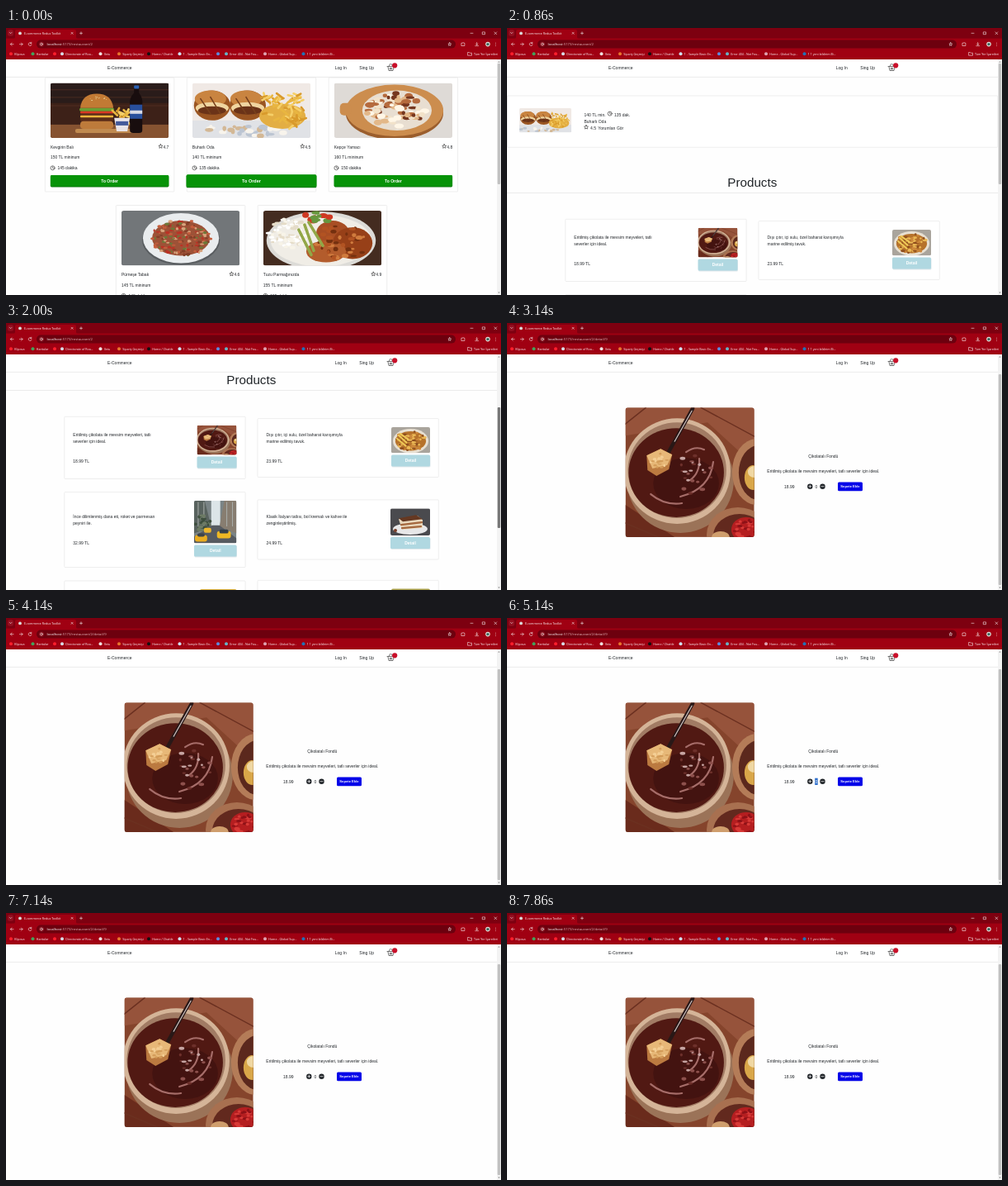
Animation of 600 by 323 pixels, one loop 8 s. Source, as an HTML page:

```html
<!DOCTYPE html>
<html lang="tr">
<head>
<meta charset="utf-8">
<title>E-commerce Redux Toolkit</title>
<style>
html, body { margin: 0; width: 100%; height: 100%; overflow: hidden; background: #fff; }
svg { display: block; }
#stage { width: 100%; height: 100%; }
text { font: 5px "Liberation Sans", Arial, sans-serif; fill: #212529; white-space: pre; }
.ui text { font: 3.6px "Open Sans", "Noto Sans", sans-serif; fill: #fff; }
.ui .url { font-size: 4.3px; fill: #e3b4b8; }
.ui .host { fill: #fff; }
.mid { text-anchor: middle; }
.end { text-anchor: end; }
.btn { font-weight: bold; fill: #fff; text-anchor: middle; }
.line { fill: none; stroke: #222; stroke-width: .6; stroke-linecap: round; stroke-linejoin: round; }
.ui .line { stroke: #fff; stroke-width: .55; }
.box { fill: #fff; stroke: #e2e2e2; stroke-width: .6; }

.list, .menu, .detail, .shop, .drag, .picked, .scroll, .add { animation: 8s linear infinite; }
.list { animation-name: list; }
.menu { animation-name: menu; }
.shop { animation-name: shop; }
.detail { animation-name: detail; }
.scroll { animation-name: scroll; }
.thumb { animation-name: thumb; }
.drag { animation-name: drag; }
.picked { animation-name: picked; }
.add { animation-name: add; transform-origin: 416px 197.8px; }
.list, .menu, .shop, .detail, .drag, .picked { animation-timing-function: step-end; }
@keyframes list { 0% { visibility: visible } 1.75%, 100% { visibility: hidden } }
@keyframes menu { 0% { visibility: hidden } 1.75% { visibility: visible } 34%, 100% { visibility: hidden } }
@keyframes shop { 0% { visibility: visible } 34%, 100% { visibility: hidden } }
@keyframes detail { 0% { visibility: hidden } 34%, 100% { visibility: visible } }
@keyframes scroll {
  0%, 16.125% { transform: none; animation-timing-function: ease-in-out }
  24.5%, 100% { transform: translateY(-118px) }
}
@keyframes thumb {
  0%, 16.125% { transform: none; animation-timing-function: ease-in-out }
  24.5%, 100% { transform: translateY(59px) }
}
@keyframes drag { 0% { fill: #c1c1c1 } 16.125% { fill: #787878 } 28.6%, 100% { fill: #c1c1c1 } }
@keyframes picked { 0% { visibility: hidden } 55.4% { visibility: visible } 87.5%, 100% { visibility: hidden } }
@keyframes add { 0%, 75% { transform: none } 77%, 86% { transform: scale(1.08) } 88%, 100% { transform: none } }
</style>
</head>
<body>
<svg id="stage" viewBox="0 0 600 323" preserveAspectRatio="none"></svg>
<script>
let seed = 7;
const random = () => (seed = (seed * 16807) % 2147483647) / 2147483647;

const text = (x, y, s, cls = '') => `<text x="${x}" y="${y}" class="${cls}">${s}</text>`;
const rect = (x, y, w, h, fill, r = 0) => `<rect x="${x}" y="${y}" width="${w}" height="${h}" fill="${fill}" rx="${r}"/>`;
const oval = (x, y, rx, ry, fill, extra = '') => `<ellipse cx="${x}" cy="${y}" rx="${rx}" ry="${ry}" fill="${fill}" ${extra}/>`;
const dot = (x, y, r, fill) => oval(x, y, r, r, fill);
const path = (d, fill, extra = '') => `<path d="${d}" fill="${fill}" ${extra}/>`;
const line = d => `<path class="line" d="${d}"/>`;
const stroke = (d, color, w) => path(d, 'none', `stroke="${color}" stroke-width="${w}" stroke-linecap="round"`);
const box = (x, y, w, h) => `<rect class="box" x="${x}" y="${y}" width="${w}" height="${h}" rx=".8"/>`;
const clock = (x, y) => `<circle class="line" cx="${x}" cy="${y}" r="2.5"/>` + line(`M${x} ${y - 1.5}v1.6l1 .6`);

function star(x, y, r = 2.6) {
  const points = Array.from({ length: 10 }, (_, i) => {
    const a = i * Math.PI / 5, d = i % 2 ? r * .48 : r;
    return `${(x + d * Math.sin(a)).toFixed(2)},${(y - d * Math.cos(a)).toFixed(2)}`;
  });
  return `<polygon class="line" points="${points.join(' ')}"/>`;
}

// Random bits of food inside an ellipse
function scatter(n, cx, cy, rx, ry, colors, size) {
  let out = '';
  for (let i = 0; i < n; i++) {
    const a = random() * 2 * Math.PI, d = Math.sqrt(random());
    out += oval((cx + rx * d * Math.cos(a)).toFixed(1), (cy + ry * d * Math.sin(a)).toFixed(1),
      (size * (.5 + random())).toFixed(1), (size * (.4 + random() * .5)).toFixed(1), colors[i % colors.length]);
  }
  return out;
}

function fries(n, x, y, w, h) {
  let out = '';
  for (let i = 0; i < n; i++) {
    const px = x + random() * w, py = y + random() * h;
    out += stroke(`M${px.toFixed(1)} ${py.toFixed(1)}l${(random() * 18 - 9).toFixed(1)} ${(random() * 14 - 7).toFixed(1)}`,
      ['#e9b640', '#f5cf68', '#d99a2b'][i % 3], 2.6);
  }
  return out;
}

const burger = (x, y, w) =>
  rect(x - w, y - 2, w * 2, 15, '#5a2c18', 4) + rect(x - w - 1, y - 4, w * 2 + 2, 4, '#69a033', 2) +
  rect(x - w, y, w * 2, 2.5, '#d93824', 1) + rect(x - w, y + 5, w * 2, 2.5, '#f0b53c', 1) +
  path(`M${x - w} ${y - 4}q2 -17 ${w} -17t${w} 17z`, '#c27a34') +
  rect(x - w, y + 12, w * 2, 9, '#bd7b3b', 4) + scatter(12, x, y - 14, w * .6, 4, ['#efd59a'], .7);

const bun = (x, y) =>
  oval(x, y, 22, 18, '#9a5522') + oval(x - 2, y - 8, 19, 10, '#c98440') + oval(x, y + 3, 20, 7, '#f0d5a0') +
  oval(x, y + 6, 17, 5, '#6b3318') + stroke(`M${x - 14} ${y - 8}l12 18m0 -20l12 20`, '#77401c', 1.6);

const photos = {
  burger: [143, 66, () => rect(0, 0, 143, 66, '#3d2118') + rect(0, 0, 143, 24, '#2a1c1a') +
    [8, 17, 27].map(y => rect(0, y, 143, .6, '#5c3325')).join('') + rect(0, 50, 143, 16, '#865331') +
    rect(30, 55, 72, 5, '#c08a50', 2) + burger(56, 34, 20) + fries(16, 80, 34, 12, 12) +
    path('M77 42h19l-3 16h-13z', '#e9e4e8') + rect(79, 46, 15, 5, '#445a9a') +
    path('M101 5h6v7q5 6 4 14v31q0 3-4 3h-7q-4 0-4-3v-31q-1-8 5-14z', '#180d0e') +
    rect(101, 3, 6, 4, '#2a61b4', 1) + rect(96, 26, 15, 17, '#284f9d') + rect(96, 33, 15, 4, '#d8dae6')],
  aroma: [143, 66, () => rect(0, 0, 143, 66, '#f0e9e5') + rect(0, 45, 143, 21, '#e0e2e6') +
    scatter(26, 60, 58, 60, 6, ['#d3b896', '#bcc5d2', '#f8f4ec'], 4) + bun(24, 27) + bun(67, 27) +
    oval(109, 40, 28, 15, '#e3ae43') + fries(60, 88, 14, 44, 36)],
  board: [143, 66, () => rect(0, 0, 143, 66, '#dedad6') + oval(73, 36, 59, 32, '#9b5e2d') + oval(73, 33, 59, 31, '#cc8d4e') +
    rect(7, 24, 14, 15, '#cc8d4e', 5) + oval(76, 33, 42, 24, '#e8ded1') +
    scatter(80, 76, 32, 37, 20, ['#b56a3d', '#f2e2c9', '#76371f', '#e3b889', '#fff6e6'], 4)],
  mince: [143, 66, () => rect(0, 0, 143, 66, '#727679') + oval(72, 35, 47, 30, '#595d60') + oval(72, 33, 46, 30, '#e9ecee') +
    oval(72, 33, 35, 21, '#9d5237') + scatter(150, 72, 33, 36, 22, ['#833f28', '#c45d3c', '#d8a27b', '#6c7839', '#bb3225'], 2)],
  grill: [143, 66, () => rect(0, 0, 143, 66, '#442c20') + oval(70, 36, 66, 35, '#dcdbd7') + oval(70, 36, 61, 31, '#f0ede6') +
    scatter(90, 31, 27, 25, 18, ['#f8f4e8', '#e5dcc8', '#fff'], 2.5) +
    oval(84, 27, 20, 15, '#a84e24') + oval(108, 39, 24, 19, '#974018') + oval(76, 49, 24, 13, '#b35c2c') +
    scatter(45, 94, 38, 32, 22, ['#d07b3d', '#74300f', '#b25322'], 3) + scatter(14, 66, 8, 17, 6, ['#cf3822', '#66963e'], 4) +
    stroke('M50 17l11 31m-18 -25l15 30m-3 -39l17 28', '#92a747', 3.5)],
  fondue: [157, 157, () => rect(0, 0, 157, 157, '#85442c') +
    path('M0 0H157V70L100 18L0 34z', '#96533b') + path('M0 118L60 157H0z', '#6a2b1c') +
    stroke('M92 0L157 35M0 20L25 0M0 140L40 157', '#6b3020', 1.5) +
    oval(67, 88, 65, 64, '#9b7358') + oval(63, 77, 65, 64, '#d4b498') + oval(63, 76, 60, 58, '#a17b64') +
    oval(62, 79, 58, 54, '#511913') + oval(74, 92, 40, 31, '#431310') +
    stroke('M67 108Q103 99 107 66M79 88Q91 79 90 62M31 105Q48 119 69 116M74 54Q85 46 96 51', '#a66d69', 2.2) +
    scatter(22, 82, 84, 24, 28, ['#8d504c', '#c6a4a2', '#6d302b'], 2.4) +
    stroke('M82 1L51 57', '#291817', 4.5) + stroke('M81 4L60 41', '#d0c5c4', 1.2) +
    path('M26 58L43 50L57 57L53 75L38 83L27 76z', '#bb7a40') + path('M26 58L43 50L57 57L51 70L33 74z', '#e7b878') +
    scatter(20, 41, 64, 11, 9, ['#f4cf95', '#d39c59'], 2) +
    oval(160, 78, 30, 40, '#b47c58') + oval(162, 79, 24, 33, '#5b281d') + oval(156, 85, 11, 15, '#d9a749') + oval(157, 78, 8, 7, '#efd7a3') +
    oval(137, 154, 38, 33, '#a87050') + oval(139, 156, 32, 27, '#62291e') +
    oval(147, 148, 18, 15, '#b51e20') + scatter(28, 147, 148, 15, 12, ['#d83a37', '#8e1117'], 2.6) +
    oval(116, 157, 11, 7, '#cf9e6d')],
  chicken: [48, 32, () => rect(0, 0, 48, 32, '#a9a49c') + oval(24, 17, 22, 15, '#e8e0d2') + oval(24, 17, 19, 12, '#b6722b') +
    scatter(60, 24, 17, 18, 12, ['#cd883b', '#8f4e1d', '#ebb956'], 2.2) + stroke('M9 10l10 9m-12 -5l11 9m-7 -15l10 7', '#efcb58', 2)],
  street: [52, 52, () => rect(0, 0, 52, 52, '#7a8486') + rect(21, 0, 11, 32, '#dce5e8') + path('M0 0H13L21 32L0 40z', '#59635f') +
    path('M52 0H37L31 32L52 40z', '#877d70') + path('M22 30H31L52 46V52H0V44z', '#565b61') +
    [5, 12, 40, 47].map(x => stroke(`M${x} 2V31`, '#aab1ad', 1)).join('') + scatter(25, 10, 27, 10, 9, ['#3d4e3d', '#6d7b65'], 2.5) +
    rect(28, 37, 17, 9, '#eeb824', 3) + rect(31, 35, 11, 5, '#354048', 2) + rect(12, 33, 9, 6, '#ebb52c', 2) + rect(1, 42, 15, 8, '#e9ac1f', 3) + rect(4, 40, 9, 4, '#3e454a', 2)],
  cake: [48, 33, () => rect(0, 0, 48, 33, '#4a4a4e') + oval(24, 25, 21, 7, '#e7e7e8') + path('M10 13L33 9L39 14V24L14 26z', '#ead9bd') +
    path('M10 12L31 8L39 13L15 16z', '#653822') + stroke('M13 20L38 17M14 24L37 22', '#a5683e', 2.2) + dot(6, 27, 2, '#783d27')],
};

function photo(name, x, y, w, h, r = 2) {
  const [vw, vh, draw] = photos[name], id = `clip${x}-${y}`;
  return `<clipPath id="${id}"><rect x="${x}" y="${y}" width="${w}" height="${h}" rx="${r}"/></clipPath>
    <g clip-path="url(#${id})"><svg x="${x}" y="${y}" width="${w}" height="${h}" viewBox="0 0 ${vw} ${vh}" preserveAspectRatio="none">${draw()}</svg></g>`;
}

function restaurant(x, y, name, image, rating, price, minutes, hover) {
  const grow = hover ? `transform="translate(${x + 78.2} ${y + 125}) scale(1.1) translate(${-x - 78.2} ${-y - 125})"` : '';
  return box(x, y, 156.4, 138) + photo(image, x + 6.5, y + 6.5, 143.4, 66.5, 3) +
    text(x + 6.5, y + 85.5, name) + star(x + 140, y + 83.2) + text(x + 150, y + 85.5, rating, 'end') +
    text(x + 6.5, y + 98.3, `${price} TL mininum`) + clock(x + 9.2, y + 109.3) + text(x + 15, y + 111.2, `${minutes} dakika`) +
    `<g ${grow}>` + rect(x + 6.5, y + 118.5, 143.4, 14, '#08770a', 1.4) + rect(x + 6.5, y + 118, 143.4, 13.6, '#079308', 1.4) +
    text(x + 78.2, y + 126.8, 'To Order', 'btn') + '</g>';
}

// baseY is the first text line; the picture sets the card height
function product(x, baseY, lines, price, image, imgX, imgY, w, h) {
  const by = imgY + h + 2;
  return box(x, imgY - 10.4, 219.3, h + 39.4) + lines.map((s, i) => text(x + 10.5, baseY + i * 8, s)).join('') +
    text(x + 10.5, baseY + 31.5, `${price} TL`) + photo(image, imgX, imgY, w, h) +
    rect(imgX + .5, by + .7, w, 14.2, '#dfe8eb', 1.5) + rect(imgX, by, w, 14, '#b0d8e1', 1.5) + text(imgX + w / 2, by + 8.6, 'Detail', 'btn');
}

const list = `<g class="list">` +
  restaurant(47.4, 60, 'Kevgirin Balı', 'burger', '4.7', 150, 145) +
  restaurant(219.3, 60, 'Buharlı Oda', 'aroma', '4.5', 140, 135, true) +
  restaurant(391.2, 60, 'Kepçe Yamacı', 'board', '4.8', 160, 150) +
  restaurant(133.4, 214.5, 'Pürneşe Tabak', 'mince', '4.6', 145, 140) +
  restaurant(305.3, 214.5, 'Tuzu Parmağınızda', 'grill', '4.9', 155, 155) + '</g>';

const menu = `<g class="menu"><g class="scroll">` + box(.3, 82, 594.5, 62.3) + photo('aroma', 15, 97, 63, 29.5, 1.5) +
  text(93.5, 106.7, '140 TL min.') + clock(124.7, 103.6) + text(130, 106.7, '135 dak.') + text(93.5, 114.7, 'Buharlı Oda') +
  star(96, 120) + text(101, 122.7, '4.5') + text(110.3, 122.7, 'Yorumları Gör') +
  `<text x="297.3" y="192" class="mid" style="font-size:15.2px">Products</text>` + rect(0, 199, 595, .6, '#dedede') +
  product(70.8, 255, ['Eritilmiş çikolata ile mevsim meyveleri, tatlı', 'severler için ideal.'], '18.99', 'fondue', 231.5, 241.7, 48, 35.8) +
  product(305, 255, ['Dışı çıtır, içi sulu, özel baharat karışımıyla', 'marine edilmiş tavuk.'], '23.99', 'chicken', 467, 244, 47, 31.5) +
  product(70.8, 354, ['İnce dilimlenmiş dana eti, roket ve parmesan', 'peyniri ile.'], '32.99', 'street', 228, 333, 51.5, 51.5) +
  product(305, 354, ['Klasik İtalyan tatlısı, bol kremalı ve kahve ile', 'zenginleştirilmiş.'], '24.99', 'cake', 466, 342.3, 48, 32.7) +
  box(70.8, 430, 219.3, 80) + rect(235, 440, 44.5, 30, '#d5aa35', 2) + box(305, 429.3, 219.3, 80) + rect(467, 439.6, 47, 30, '#a9a04a', 2) +
  '</g></g>';

const detail = `<g class="detail">` + photo('fondue', 143.4, 102.3, 156.4, 156.6, 3.5) +
  text(383.3, 163, 'Çikolatalı Fondü', 'mid') + text(383.3, 180.8, 'Eritilmiş çikolata ile mevsim meyveleri, tatlı severler için ideal.', 'mid') +
  text(336, 199.6, '18.99') + dot(367.3, 197.7, 3.2, '#212529') + dot(382.5, 197.7, 3.2, '#212529') +
  stroke('M365.8 197.7h3m-1.5 -1.5v3M381 197.7h3', '#fff', .7) + text(374.9, 199.6, '0', 'mid') +
  `<g class="picked">` + rect(373.2, 193.7, 3.5, 8.3, '#2f6fcb') + `<text x="374.9" y="199.6" class="mid" style="fill:#fff">0</text></g>` +
  `<g class="add">` + rect(401, 192.4, 30, 10.8, '#0505e8', 1.5) + `<text x="416" y="199.3" class="btn" style="font-size:4.17px">Sepete Ekle</text></g></g>`;

const header = rect(0, 38, 595, 21, '#fff') + rect(0, 58.9, 595, .6, '#dedede') +
  text(123, 50.4, 'E-Commerce') + text(398.8, 50.4, 'Log In') + text(428.3, 50.4, 'Sing Up') +
  line('M462 46.5h8.5M463 47l1 4.5h5l1-4.5M464.2 46l1.5-2.6M468.5 46l-1.5-2.6M465.3 48.2v1.8M466.5 48.2v1.8M467.7 48.2v1.8') + dot(471.2, 45.3, 3.1, '#c8102a');

const scrollbar = rect(595, 38, 5, 285, '#f3f3f3') + path('M596.4 41.6l1.1-1.4l1.1 1.4zM596.4 319.6l1.1 1.4l1.1-1.4z', '#777') +
  `<g class="shop"><g class="scroll thumb"><rect class="drag" x="595.8" y="43" width="3.4" height="146" rx="1"/></g></g>` +
  `<g class="detail">${rect(595.8, 62, 3.4, 255, '#c1c1c1', 1)}</g>`;

const bookmarks = [
  [6, '#ff1f2d', 'Klipova'], [32.5, '#43a35b', 'Haritalar'], [59, '#ff1f2d', ''], [68, '#d8dde8', 'Directorate of Roa...'],
  [114.5, '#eee2e0', 'Iletu'], [137, '#e8762d', 'Sipariş Geçmişi'], [173, '#111', 'Home / Chattle'], [210.5, '#cfe2f6', '1 - Sample Basic En...'],
  [257, '#5c8be0', ''], [267, '#66b3c5', 'Error 404 - Not Fou...'], [314, '#dfa1b0', 'Home - Global Sup...'], [360.5, '#2172b8', '1 1 yeni bildirim Bi...'],
].map(([x, color, label]) => dot(x, 31.2, 2, color) + text(x + 4.3, 32.5, label)).join('');

const url = (cls, tail) => `<text x="49.5" y="21.2" class="url ${cls}"><tspan class="host">localhost</tspan>:5173/restaurant/2${tail}</text>`;

const browser = `<g class="ui">` + rect(0, 0, 600, 13, '#7d0010') + rect(0, 12.6, 600, 25.4, '#a00012') +
  path('M9 13q2 0 2-2V4q0-2 2-2H83q2 0 2 2v7q0 2 2 2z', '#a00012') + rect(2, 2.2, 7, 7.6, '#930f20', 2) + line('M4.3 5.4l1.3 1.3l1.3-1.3') +
  dot(17, 6.4, 1.9, '#dadada') + text(22, 7.7, 'E-commerce Redux Toolkit') + line('M79 5.2l2.2 2.2m0-2.2l-2.2 2.2M89.5 6.3h3m-1.5-1.5v3') +
  line('M563 6.3h3M577.7 4.9h2.8v2.8h-2.8zM592 4.9l2.8 2.8m0-2.8l-2.8 2.8') +
  line('M9 19.6H5.4l1.6-1.7m-1.6 1.7l1.6 1.7M16.5 19.6h3.6l-1.6-1.7m1.6 1.7l-1.6 1.7M30.6 18.3a1.9 1.9 0 1 0 .4 1.7M30.8 17.2v1.3h-1.4') +
  rect(37, 14.6, 508, 10, '#6d000e', 5) + dot(43, 19.6, 3, '#8c1724') + `<circle class="line" cx="43" cy="19.6" r="1.4"/>` +
  url('shop', '') + url('detail', '/detail/9') + star(537.8, 19.7, 2) +
  line('M552.3 18.2h1.2q.6-1.6 1.2 0h1.2v3.3h-3.6zM570.7 17.4v3m-1.2-1.2l1.2 1.2l1.2-1.2M568.8 21.6h3.8') +
  dot(584, 19.6, 2.8, '#e0d9d6') + dot(584, 19.6, 1.7, '#36665b') + [17.9, 19.6, 21.3].map(y => dot(593.5, y, .45, '#fff')).join('') +
  bookmarks + line('M560 29.5h1.5l.7.7h2.3v3H560z') + text(567, 32.5, 'Tüm Yer İşaretleri') + '</g>';

document.getElementById('stage').innerHTML = rect(0, 0, 600, 323, '#fefefe') + list + menu + detail + header + scrollbar + browser;
</script>
</body>
</html>
```
